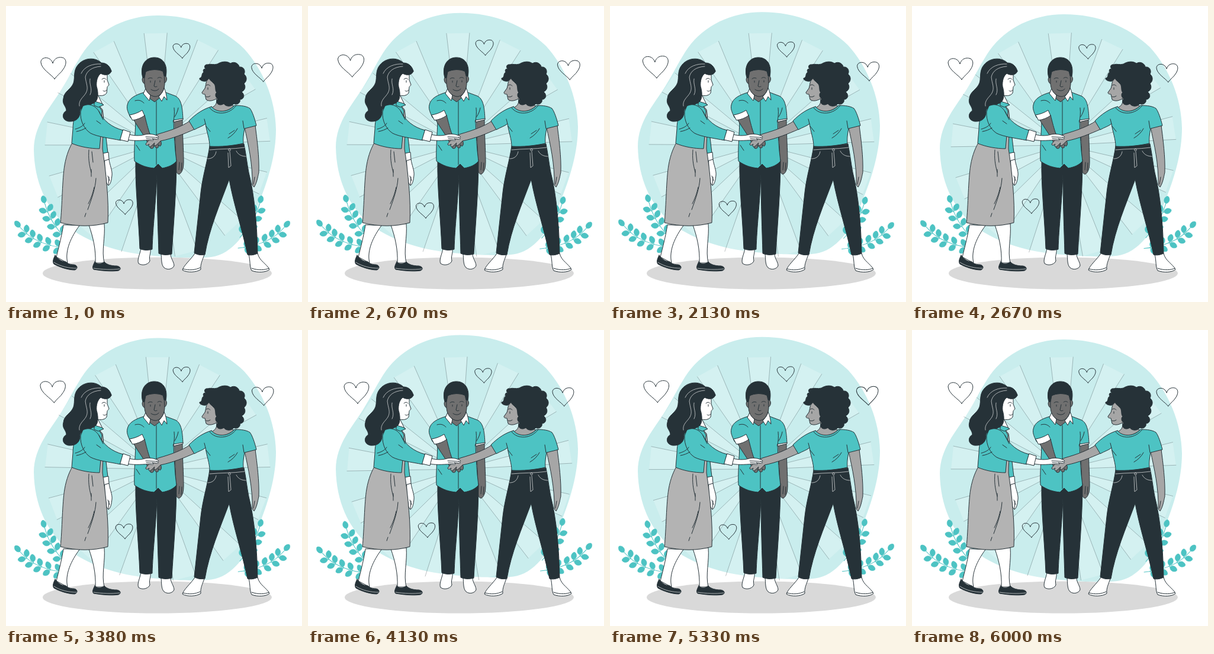
Recreate the animation shown at these times as an HTML page. Size 500 by 500 pixels, loop 6040 ms.

```html
<!DOCTYPE html>
<html lang="en">
<head>
<meta charset="utf-8">
<title>Joined hands</title>
<style>
html, body { margin: 0; width: 100%; height: 100%; overflow: hidden; background: #fff; }
svg { display: block; width: 100vw; height: 100vh; }
path { stroke-linecap: round; stroke-linejoin: round; }
.o path { stroke: #263238; stroke-width: 1; }
.o .l, .l { fill: none; }
.o .w, .w { fill: none; stroke: #e8eaea; stroke-width: .7; }
.t { fill: #4dc3c3; }
.k { fill: #263238; }
.g { fill: #b3b3b3; }
.m { fill: #707070; }
.s { fill: #a6a6a6; }
.f { fill: #fff; }
</style>
</head>
<body>
<svg viewBox="0 0 500 500">
  <path id="blob" fill="#c9eded" d="M257 16.1C205 16 159 39 132 76C118 96 108 118 93 142C76 170 47 200 47 243C48 297 68 340 100 369C137 400 190 416 240 421C282 425 318 427 347 424C382 419 408 384 425 338C444 292 456 250 456 208C455 157 434 107 402 72C365 36 313 16 257 16.1Z"/>
  <g id="rays" stroke="#263238" stroke-opacity=".38" stroke-width=".8"></g>
  <g id="plants" class="t"></g>
  <ellipse cx="255.500" cy="451.500" rx="193.500" ry="27" fill="#d9d9d9"/>
  <g id="hearts" class="o"></g>

  <g class="o" id="man">
    <path class="m" d="M285 192L298 190C298 215 300 245 300 263C300 273 298 281 293 284C287 285 286 274 287 262Z"/>
    <path class="l" d="M293 264L292 277M297 265L296 278"/>
    <path class="f" d="M228 410C226 420 221 429 224 435C231 440 242 436 243 430C241 423 245 418 244 411Z"/>
    <path class="f" d="M262 419C263 428 262 437 267 442C273 447 283 444 284 438C283 431 278 426 278 419Z"/>
    <path class="k" d="M219 261C218 305 224 358 226 410C232 413 240 413 247 411C248 373 253 335 255 284C255 335 257 380 258 418C265 421 273 421 280 419C283 367 288 312 288 260Z"/>
    <path class="t" d="M233 146C219 150 207 156 205 167C203 174 207 181 210 188L219 194C218 222 216 244 217 262C228 270 239 273 250 274L257 267L264 274C274 272 282 269 288 262C285 240 284 217 283 195L299 191C298 174 297 157 286 152L270 146Z"/>
    <path class="f" d="M283 193L299 190L299 192L283 196Z"/>
    <path class="l" d="M254 161L254 268M284 172C285 181 284 188 283 195M291 172C290 178 288 182 285 187M218 160C225 158 229 160 233 164M220 235L226 244"/>
    <path class="m" d="M241 140C241 147 239 149 237 152L251 162L266 150C262 148 262 145 262 138Z"/>
    <path class="f" d="M236 139L232 148L242 160L244 151C240 147 238 144 236 139ZM267 138C266 144 262 149 258 153L263 161L267 153L272 159C271 151 270 144 267 138Z"/>
    <path class="m" d="M234 120C228 119 229 130 235 132ZM267 118C273 117 273 128 267 131Z"/>
    <path class="m" d="M234 112C241 106 261 106 267 112L268 132C267 146 259 153 252 153C242 152 235 144 234 132Z"/>
    <path class="k" d="M231 121C226 104 233 88 249 87C265 86 274 99 270 119L267 118L265 110C256 106 243 107 236 111L234 121Z"/>
    <path class="l" d="M240 123C242 121 245 121 247 122M256 122C258 120 261 120 263 122M252 126L250 135C251 137 253 137 255 136M245 141C249 144 255 144 258 140"/>
    <path class="k" d="M244 126.500V129M260 126V128.500"/>
    <path class="m" d="M215 191L234 184C237 196 240 208 243 216L257 223C263 227 264 235 260 237L257 234C259 239 256 241 253 239L249 235C251 240 247 242 244 240L239 231C235 220 224 207 215 191Z"/>
    <path class="f" d="M209 184C216 183 224 180 230 176L234 185C229 189 221 192 214 193Z"/>
  </g>

  <g class="o" id="right-woman">
    <path class="s" d="M403 205L421 202C424 225 428 255 427 281C425 290 424 298 419 306L416 302C417 267 409 233 403 205Z"/>
    <path class="l" d="M420 289L418 301"/>
    <path class="f" d="M319 418C311 430 301 437 298 446C306 451 322 450 329 445C328 436 332 429 335 420Z"/>
    <path class="f" d="M410 420C413 430 411 440 415 447C425 451 440 450 445 445C441 436 428 431 425 418Z"/>
    <path class="l" d="M299 444C309 447 320 446 328 442M415 443C426 447 438 446 444 443"/>
    <path class="k" d="M344 236C341 260 332 287 329 315L318 417C324 421 330 421 336 420C343 377 361 336 377 293C384 333 399 377 408 420C414 422 420 420 425 418C424 370 420 320 410 281C407 265 405 247 402 233Z"/>
    <path class="w" d="M344 243C363 241 382 242 403 239M378 246L380 270L376 273L375 248M341 258C350 258 354 252 355 246M389 245C392 251 398 254 405 254"/>
    <circle cx="377.500" cy="243" r="1.800" class="w"/>
    <path class="s" d="M355 153C357 162 356 168 347 172C357 181 373 180 385 169L372 164Z"/>
    <path class="s" d="M311 194C296 204 279 210 258 216C250 219 242 225 236 233C236 236 239 236 242 233C239 238 243 239 246 236L251 231C249 236 252 237 255 234L261 228C281 224 301 216 319 208Z"/>
    <path class="t" d="M347 170C333 174 321 182 309 194L318 209C325 205 332 203 337 199C339 213 344 225 344 237C363 238 383 236 401 232C400 222 402 213 403 207L423 202C420 190 416 178 412 173C406 169 397 168 386 168C375 180 356 181 347 170Z"/>
    <path class="l" d="M344 172C354 185 377 184 389 168M337 199L335 191M402 207L400 194M375 223C382 219 387 214 391 207M377 216L386 210M338 203L345 212"/>
    <path class="s" d="M343 121C337 126 338 134 336 139L331 146C331 149 334 149 336 149L338 158C343 162 351 160 358 155L362 132Z"/>
    <path class="k" d="M337 127C331 128 326 124 327 122C333 121 329 114 334 112C332 108 334 105 338 107C333 103 336 98 341 99C345 97 351 100 357 98C365 93 374 93 379 97C387 92 394 99 394 103C402 102 405 110 402 115C408 120 407 127 402 131C406 137 403 143 398 145C405 151 401 158 395 158C397 164 389 168 385 165C379 172 370 169 368 165C359 171 352 162 358 157C353 154 353 148 356 146C352 143 356 134 350 130C348 127 344 126 343 122C341 125 339 126 337 127Z"/>
    <path class="l" d="M338 134C341 132 343 133 345 135M338 153C340 154 342 154 345 152"/>
    <path class="k" d="M341 138V141"/>
  </g>

  <g class="o" id="left-woman">
    <path class="f" d="M167 257L174 259C175 268 180 278 179 286C178 294 177 301 173 303C167 298 170 290 167 283Z"/>
    <path class="l" d="M172 287L175 295M173 303L174 289"/>
    <path class="t" d="M160 220L169 222L172 248L163 250Z"/>
    <path class="f" d="M163 249L173 247L174 259L164 262Z"/>
    <path class="f" d="M97 370C94 389 89 408 85 424L104 434C99 413 110 390 124 371Z"/>
    <path class="f" d="M140 370C147 390 152 411 151 434L166 434C161 413 168 391 166 368Z"/>
    <path class="k" d="M83 421C80 427 78 432 81 436C90 441 105 446 116 446C122 444 121 438 115 437C107 437 103 434 101 432C94 432 88 428 83 421Z"/>
    <path class="k" d="M150 432C147 438 145 442 148 445C160 447 178 449 190 447C195 445 194 440 187 439C178 439 170 437 166 432C160 437 154 437 150 432Z"/>
    <path class="w" d="M81 433C92 440 106 443 119 443M148 443C162 445 179 446 192 444"/>
    <path class="g" d="M155 166L163 175C167 195 163 220 163 241C169 280 174 330 172 366C148 373 119 373 92 366C95 337 95 292 99 269C102 251 108 237 114 228Z"/>
    <path class="l" d="M140 243C139 257 140 266 144 281M145 246L147 264M144 276L144 288M152 291C151 308 145 325 138 344M149 306C146 319 143 326 139 334M135 350L133 356"/>
    <path class="t" d="M128 166C117 176 113 193 113 208L111 232C125 238 143 241 158 241L160 219L162 177L154 164Z"/>
    <path class="f" d="M150 143L152 166L163 166L155 150Z"/>
    <path class="f" d="M148 121C155 112 167 110 171 116L171 125L174 133C173 135 171 136 171 137L170 147C166 153 157 152 152 150Z"/>
    <path class="t" d="M150 161C154 163 160 163 165 167L156 171L149 168Z"/>
    <path class="k" d="M178 110C176 102 170 96 161 96C151 86 132 87 122 99C113 109 117 121 114 130C110 141 98 144 97 156C94 166 102 169 102 177C94 181 94 193 106 195C119 196 126 188 125 177C127 169 141 170 152 161C157 154 155 142 153 136C152 126 155 118 160 114C167 118 176 117 178 110Z"/>
    <path class="w" d="M160 98C147 97 132 102 127 114M160 102C145 103 136 110 134 120C135 131 140 138 135 147C131 154 122 159 124 169M142 123C140 133 147 140 142 150"/>
    <path class="l" d="M162 124C165 121 167 122 169 124M164 143C166 145 168 144 170 142"/>
    <path class="k" d="M166 126V129"/>
    <path class="t" d="M130 169C139 164 150 167 157 178C164 193 178 205 198 210L194 227C174 223 155 221 143 215C132 208 125 194 126 179Z"/>
    <path class="l" d="M117 208C124 206 130 203 133 198M119 212C125 211 130 209 135 206M157 178L164 192M153 194L160 199"/>
    <path class="f" d="M208 217C219 220 229 219 235 217C243 215 251 217 257 220C259 222 257 223 254 222C259 224 258 226 254 225L247 224C251 227 248 228 245 227C232 226 220 229 205 226Z"/>
    <path class="l" d="M236 221L254 222M237 224L248 225"/>
    <path class="f" d="M198 209L210 213L206 229L193 226Z"/>
  </g>
</svg>
<script>
const LOOP = 6040;
const part = id => document.getElementById(id);
const polar = (deg, r) => {
  const a = deg * Math.PI / 180;
  return [256 + r * Math.sin(a), 235 - r * Math.cos(a)].map(v => v.toFixed(1)).join(' ');
};

// Thirteen wedges of light
let rays = '';
for (let i = 0; i < 13; i++) {
  const mid = i * 360 / 13 - 1;
  rays += `<path fill="#fff" fill-opacity=".2" d="M${polar(mid - 5.9, 190)}L256 235L${polar(mid + 5.9, 190)}"/>`;
}
part('rays').innerHTML = rays;

// A curved stem with paired, stalked leaves and one leaf at the tip
function branch([x0, y0], [x1, y1], [x2, y2], pairs, spread) {
  const leaf = (x, y, deg) =>
    `<path transform="translate(${x} ${y}) rotate(${deg})" stroke="#4dc3c3" stroke-width=".6" d="M0 0L2 0C4 -5 10 -6 14 -2Q16 0 14 2C10 6 4 5 2 0Z"/>`;
  let out = `<path class="l" stroke="#4dc3c3" d="M${x0} ${y0}Q${x1} ${y1} ${x2} ${y2}"/>`;
  for (let i = 0; i <= pairs; i++) {
    const u = i / pairs * .9 + .1, v = 1 - u;
    const x = v * v * x0 + 2 * u * v * x1 + u * u * x2;
    const y = v * v * y0 + 2 * u * v * y1 + u * u * y2;
    const dir = Math.atan2(v * (y1 - y0) + u * (y2 - y1), v * (x1 - x0) + u * (x2 - x1)) * 180 / Math.PI;
    out += i < pairs ? leaf(x, y, dir - spread) + leaf(x, y, dir + spread) : leaf(x, y, dir);
  }
  return out;
}
const plant = branch([102, 409], [50, 404], [25, 375], 5, 50) + branch([99, 391], [74, 364], [66, 335], 4, 52);
part('plants').innerHTML = `<g>${plant}</g><g transform="matrix(-1 0 0 1 494 0)">${plant}</g>`;

const heart = (x, y, s) =>
  `<path class="l" vector-effect="non-scaling-stroke" transform="translate(${x} ${y}) scale(${s})" d="M2 35C-4 27 -20 19 -21 7C-21 -2 -5 -4 -1 9C2 -2 12 -2 17 0C23 4 21 12 17 18C13 25 6 29 2 35Z"/>`;
part('hearts').innerHTML =
  heart(82, 89, 1) + heart(431, 98.5, .86) + heart(296, 65.5, .68) + heart(200.500, 326.500, .68);

const sway = p => p < .25 ? 4 * p : p < .75 ? 2 - 4 * p : 4 * p - 4;
const BEAT = [[0, 0], [.1, 1], [.3, 0], [.4, 0], [.5, 1], [.585, 0], [1, 0]];
function beat(p) {
  const i = BEAT.findIndex(k => k[0] > p), [a, va] = BEAT[i - 1], [b, vb] = BEAT[i];
  return va + (vb - va) * (p - a) / (b - a);
}
const place = (id, value) => part(id).setAttribute('transform', value);

function draw(now) {
  const t = now % LOOP;
  const phase = period => t % period / period;
  place('blob', `translate(0 ${-10 * (1 - Math.abs(1 - 2 * phase(3000)))})`);
  place('rays', `rotate(${sway(phase(1500))} 256 235)`);
  place('plants', `rotate(${sway(phase(6000))} 247 365)`);
  const pulse = Math.min(t + 17, 6000) % 1500 / 1500;
  place('hearts', `translate(256 203) scale(${1 + .092 * beat(pulse)}) translate(-256 -203)`);
}
const start = performance.now();
function tick() {
  draw(performance.now() - start);
  requestAnimationFrame(tick);
}
tick();
</script>
</body>
</html>
```
